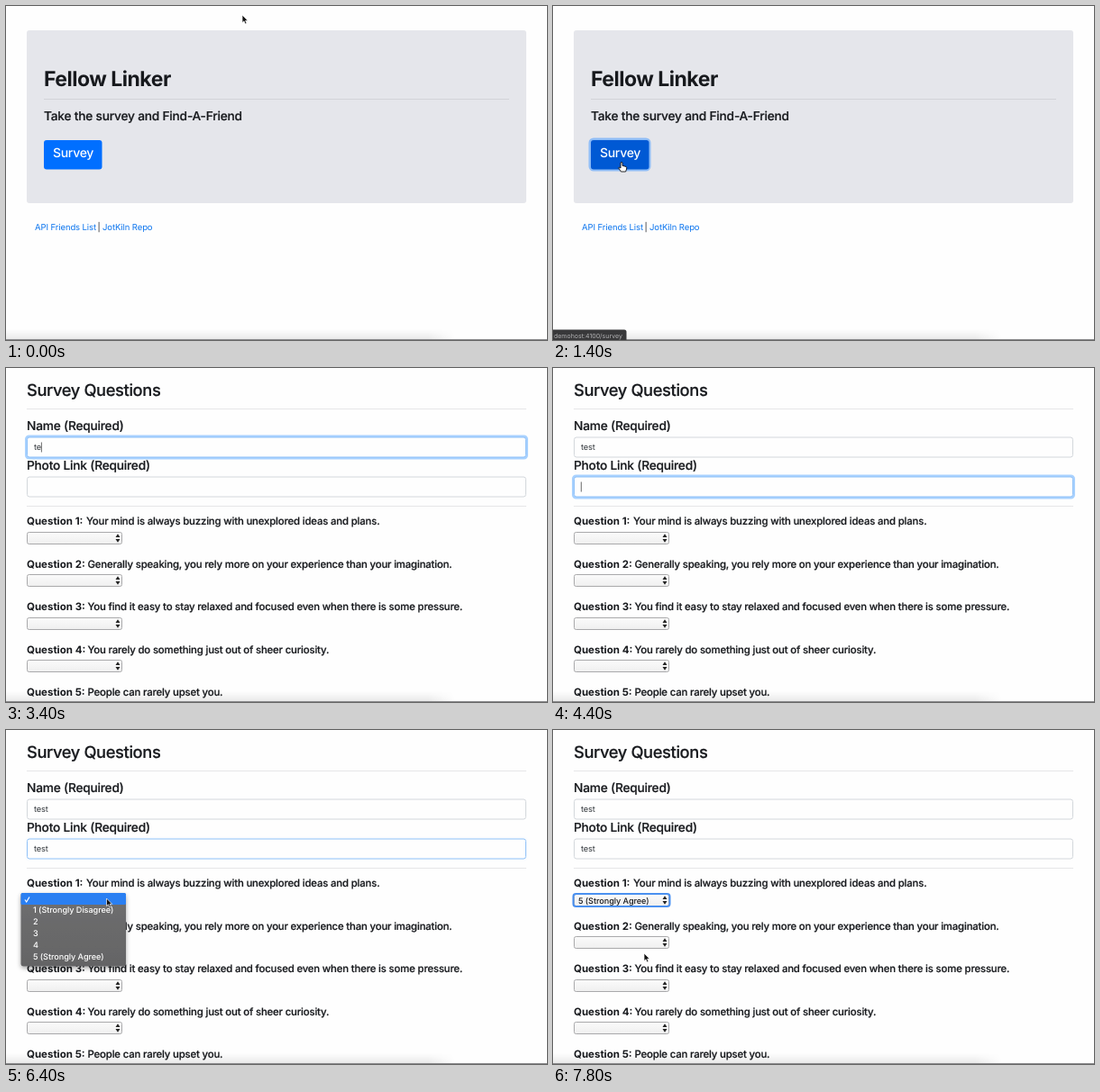
An HTML page that plays this animation: 600x371 px, repeating every 8000 ms.

```html
<!DOCTYPE html>
<html lang="en">
<head>
<meta charset="utf-8">
<title>Survey demo</title>
<style>
  html, body { margin: 0; width: 100%; height: 100%; overflow: hidden; background: #fefefe; }
  svg { display: block; width: 100vw; height: 100vh; }
  text { font-family: Inter, "Open Sans", sans-serif; fill: #17191d; white-space: pre; text-rendering: geometricPrecision; }
  .title { font-size: 23px; font-weight: 700; letter-spacing: -.5px; }
  .heading, .label, .question { font-weight: 500; stroke: #17191d; stroke-width: .2px; }
  .heading { font-size: 18.3px; letter-spacing: -.38px; }
  .label { font-size: 13.7px; letter-spacing: -.2px; }
  .question { font-size: 11.4px; letter-spacing: -.18px; }
  .number { font-size: 11.5px; font-weight: 700; letter-spacing: 0; stroke: none; }
  .button { font-size: 14px; font-weight: 500; letter-spacing: -.3px; fill: #fff; }
  .small { font-size: 9.5px; letter-spacing: -.1px; }
  .link { fill: #0a74ee; }
  .value { font-size: 9.2px; letter-spacing: -.1px; fill: #30353a; }
  .option { font-size: 9.1px; font-weight: 500; letter-spacing: -.05px; }
  .menu text { fill: #fff; }
  .status { font-size: 7px; fill: #b4b4b6; }
  .rule { stroke: #e6e6e8; }
  .box { fill: #fefefe; stroke: #d3d7dc; }
  .box.active { stroke: #8fc1f8; }
  .glow { fill: none; stroke: #a9d2ff; stroke-width: 3; }
</style>
</head>
<body>
<svg viewBox="0 0 600 371">
  <defs>
    <linearGradient id="shade" x2="0" y2="1">
      <stop offset="0" stop-color="#000" stop-opacity="0"/>
      <stop offset="1" stop-color="#000" stop-opacity=".08"/>
    </linearGradient>
    <linearGradient id="fade">
      <stop offset=".78" stop-color="#fff"/>
      <stop offset=".83" stop-color="#fff" stop-opacity="0"/>
    </linearGradient>
    <mask id="edge"><rect y="355" width="600" height="16" fill="url(#fade)"/></mask>
    <linearGradient id="face" x2="0" y2="1">
      <stop offset="0" stop-color="#fbfbfb"/><stop offset="1" stop-color="#efefef"/>
    </linearGradient>
    <linearGradient id="panel" x2="0" y2="1">
      <stop offset="0" stop-color="#6f6f70"/><stop offset="1" stop-color="#646465"/>
    </linearGradient>
    <filter id="soft" x="-15%" y="-15%" width="130%" height="135%">
      <feDropShadow dx="0" dy="2" stdDeviation="2.5" flood-opacity=".35"/>
    </filter>
  </defs>
  <rect width="600" height="371" fill="#fefefe"/>

  <g id="home">
    <rect x="23" y="27" width="554" height="192" rx="3" fill="#e5e6eb"/>
    <text class="title" x="42" y="89">Fellow Linker</text>
    <path d="M42 103.5H558" stroke="#d2d3d8"/>
    <text class="label" x="42" y="127">Take the survey and Find-A-Friend</text>
    <rect id="ring" x="41" y="148" width="66" height="34" rx="4" fill="none" stroke="#8fbdf7" stroke-width="3"/>
    <rect id="button" x="42" y="149" width="64.5" height="32.5" rx="3"/>
    <text class="button" x="52" y="168">Survey</text>
    <text class="small link" x="32" y="249">API Friends List</text>
    <text class="small" x="101.5" y="249">|</text>
    <text class="small link" x="107" y="249">JotKiln Repo</text>
  </g>

  <g id="form">
    <text class="heading" x="23" y="31">Survey Questions</text>
    <path class="rule" d="M23 45.5H577M23 153.5H577"/>
    <text class="label" x="23" y="69">Name (Required)</text>
    <text class="label" x="23" y="113">Photo Link (Required)</text>
    <g id="fields"></g>
    <g id="questions"></g>
    <rect id="selectRing" x="22.5" y="182" width="107" height="14" rx="3" fill="none" stroke="#4a90f0" stroke-width="2"/>
    <text id="answer" class="option" x="28" y="192.5">5 (Strongly Agree)</text>
  </g>

  <rect y="359" width="600" height="11" fill="url(#shade)" mask="url(#edge)"/>
  <rect y="370" width="600" height="1" fill="#8c8c8e"/>
  <g id="status">
    <path d="M0 359.5H79Q81.5 359.5 81.5 362V371H0Z" fill="#38383a"/>
    <text class="status" x="1" y="368.5">demohost:4100/survey</text>
  </g>

  <g id="menu" class="menu">
    <rect x="16.5" y="181" width="116.5" height="81.5" rx="3" fill="url(#panel)" filter="url(#soft)"/>
    <rect id="bar" x="16.5" width="116.5" height="13" rx="1.5" fill="#2a7ff2"/>
    <path d="M21 188.5L22.7 191L26 185.5" fill="none" stroke="#fff" stroke-width="1.2"/>
    <g id="options"></g>
  </g>

  <g id="cursor">
    <path id="arrow" d="M0 0V8.6L2 6.8L3.4 10L5 9.3L3.6 6.3H6.2Z" fill="#111" stroke="#fff" stroke-width=".7"/>
    <path id="hand" d="M-1 0Q0-1.2 1 0V3.4L5 4.4Q6 5 5.6 7L4.6 10H-.6L-3.4 5.8Q-3.4 4.4-1 6Z" fill="#fff" stroke="#111" stroke-width=".9"/>
    <path id="beam" d="M-1.8-4Q0-4 0-3Q0-4 1.8-4M0-3V3M-1.8 4Q0 4 0 3Q0 4 1.8 4M-1 1H1" fill="none" stroke="#333" stroke-width=".9"/>
  </g>
</svg>
<script>
const $ = id => document.getElementById(id);
const show = (id, on) => { $(id).style.display = on ? "" : "none"; };

const questions = [
  "Your mind is always buzzing with unexplored ideas and plans.",
  "Generally speaking, you rely more on your experience than your imagination.",
  "You find it easy to stay relaxed and focused even when there is some pressure.",
  "You rarely do something just out of sheer curiosity.",
  "People can rarely upset you."
];
const options = ["1 (Strongly Disagree)", "2", "3", "4", "5 (Strongly Agree)"];

const picker = y => `
  <rect x="23.5" y="${y}" width="105" height="13" rx="2" fill="url(#face)" stroke="#a9a9ab"/>
  <path d="M121.5 ${y + 5.6}h5l-2.5-3.8zM121.5 ${y + 7.5}h5l-2.5 3.8z" fill="#222"/>`;

$("questions").innerHTML = questions.map((words, i) => {
  const y = 174 + i * 47.5;
  return `<text class="question number" x="23" y="${y}">Question ${i + 1}:</text>
    <text class="question" x="${i ? 90.5 : 89}" y="${y}">${words}</text>${picker(Math.floor(y) + 8.5)}`;
}).join("");

$("options").innerHTML = options.map((words, i) =>
  `<text class="option" x="30" y="${203.3 + i * 13}">${words}</text>`).join("");

const makeField = (name, y) => `
  <rect id="${name}Glow" class="glow" x="22.5" y="${y - 1}" width="555" height="24" rx="3"/>
  <rect id="${name}Box" class="box" x="23.5" y="${y}" width="553" height="22" rx="2.5"/>
  <text id="${name}Text" class="value" x="31" y="${y + 14.3}"></text>
  <path id="${name}Caret" d="M0 ${y + 5.5}v11" stroke="#444" stroke-width=".8"/>`;
$("fields").innerHTML = makeField("name", 77) + makeField("photo", 121);

// Each step changes only the listed parts of the state.
const start = {
  page: "home", cursor: ["arrow", 262, 10], hover: false, ring: false, status: false,
  name: "", nameFocus: 0, photo: "", photoFocus: 0, caret: "",
  menu: 0, item: 0, answered: false
};
const steps = [
  [200, { cursor: ["arrow", 128, 240] }],
  [600, { cursor: ["arrow", 104, 213] }],
  [800, { cursor: ["arrow", 84, 188] }],
  [1000, { cursor: ["hand", 76, 175], hover: true, status: true }],
  [1200, { cursor: ["hand", 76, 174] }],
  [1400, { ring: true }],
  [1600, { page: "form", cursor: ["arrow", 75, 174] }],
  [1800, { cursor: ["arrow", 79, 164], status: false }],
  [2000, { cursor: ["arrow", 97, 128] }],
  [2200, { cursor: ["beam", 117, 96] }],
  [2400, { cursor: ["beam", 123, 88.5] }],
  [2600, { nameFocus: .5 }],
  [2800, { nameFocus: 1, caret: "name" }],
  [3000, { caret: "" }],
  [3200, { name: "t", caret: "name", cursor: null }],
  [3400, { name: "te" }],
  [3600, { name: "tes" }],
  [3800, { name: "test" }],
  [4000, { caret: "" }],
  [4200, { nameFocus: .3, photoFocus: .6, caret: "photo" }],
  [4400, { nameFocus: 0, photoFocus: 1 }],
  [4800, { photo: "te" }],
  [5000, { photo: "test" }],
  [5400, { cursor: ["beam", 42, 106] }],
  [5600, { cursor: ["beam", 62, 132] }],
  [5800, { cursor: ["arrow", 92, 164] }],
  [6000, { cursor: ["arrow", 111.5, 187] }],
  [6400, { photoFocus: .05, caret: "", menu: 1 }],
  [6600, { photoFocus: 0, cursor: ["arrow", 111, 197], item: 1 }],
  [6800, { cursor: ["arrow", 108, 213], item: 2 }],
  [7000, { cursor: ["arrow", 104, 235], item: 4 }],
  [7200, { cursor: ["arrow", 101.5, 247], item: 5 }],
  [7400, { cursor: ["arrow", 101, 248] }],
  [7600, { menu: .5, answered: true }],
  [7800, { menu: 0 }]
];

function drawField(name, state) {
  const focus = state[name + "Focus"], text = $(name + "Text");
  $(name + "Glow").style.opacity = focus;
  $(name + "Box").classList.toggle("active", focus > 0);
  text.textContent = state[name];
  show(name + "Caret", state.caret === name);
  const width = state[name] ? text.getComputedTextLength() : 0;
  $(name + "Caret").setAttribute("transform", `translate(${31.3 + width})`);
}

function draw(state) {
  show("home", state.page === "home");
  show("form", state.page === "form");
  show("ring", state.ring);
  show("status", state.status);
  $("button").setAttribute("fill", state.hover ? "#0059d4" : "#006fff");
  drawField("name", state);
  drawField("photo", state);
  show("selectRing", state.answered);
  show("answer", state.answered);
  show("menu", state.menu > 0);
  $("menu").style.opacity = state.menu;
  $("bar").setAttribute("y", 181 + state.item * 13);
  show("cursor", state.cursor);
  if (!state.cursor) return;
  const [shape, x, y] = state.cursor;
  for (const id of ["arrow", "hand", "beam"]) show(id, id === shape);
  $("cursor").setAttribute("transform", `translate(${x} ${y})`);
}

const began = performance.now();
let drawn = -1;
function tick() {
  const time = (performance.now() - began) % 8000;
  const past = steps.filter(([at]) => at <= time);
  if (past.length !== drawn) {
    drawn = past.length;
    draw(Object.assign({}, start, ...past.map(([, change]) => change)));
  }
  requestAnimationFrame(tick);
}
tick();
</script>
</body>
</html>
```
